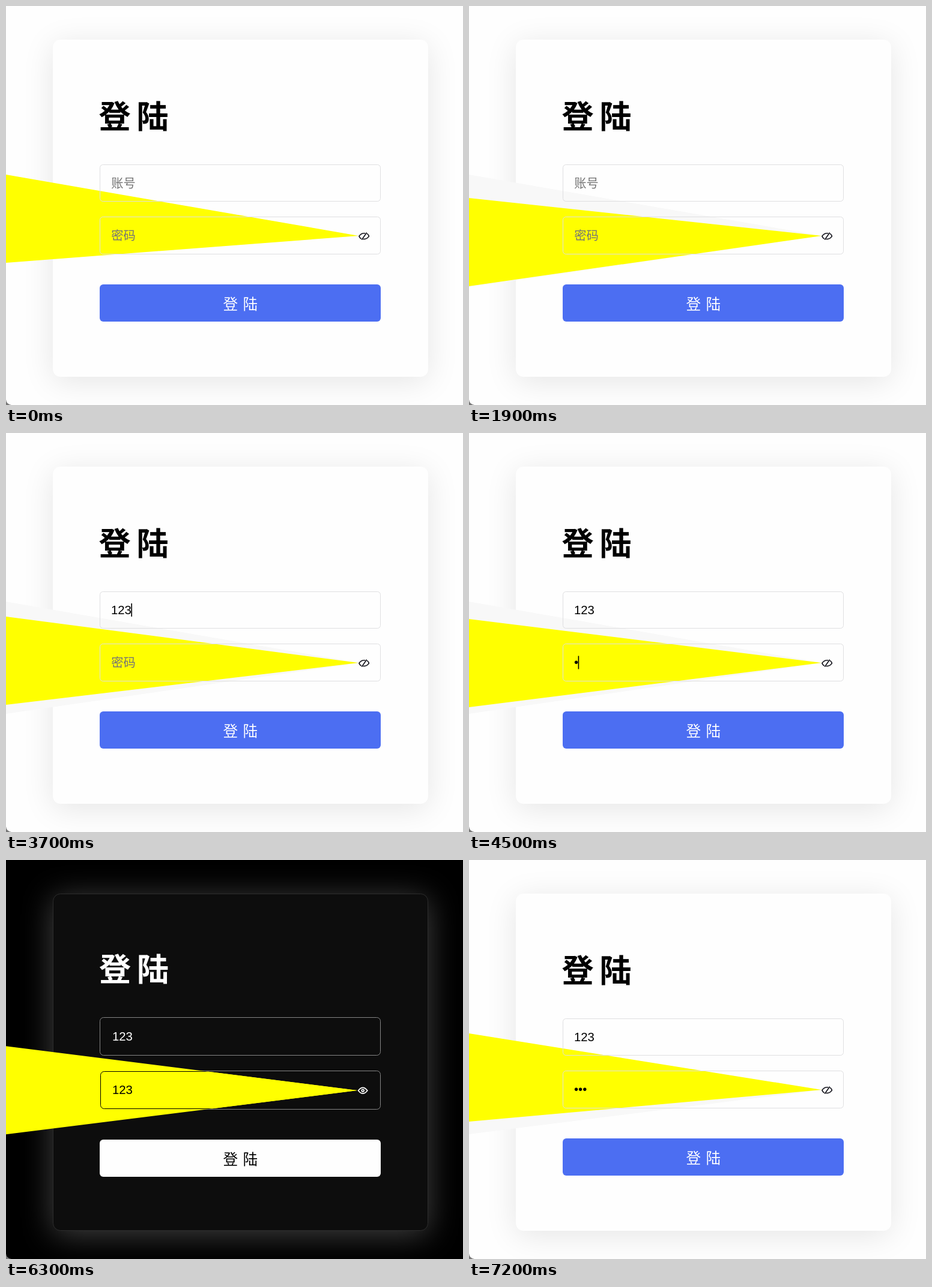
Write an HTML page that moves like this. It is 761 px wide and 665 px high and loops after 7500 ms.

```html
<!DOCTYPE html>
<html lang="zh-CN">
<head>
<meta charset="utf-8">
<title>登陆</title>
<style>
  html, body { margin: 0; width: 100%; height: 100%; overflow: hidden; background: #fefefe; }
  body.dark { background: #000; }
  .card {
    position: absolute; left: 78px; top: 56px; width: 625px; height: 562px;
    box-sizing: border-box; border-radius: 12.5px; background: #fefefe;
    box-shadow: 0 8px 52px rgba(0, 0, 0, .1);
  }
  .dark .card {
    background: #0d0d0d; border: 1px solid #2c2c2c;
    box-shadow: 0 6px 52px rgba(255, 255, 255, .26);
  }
  svg { position: absolute; left: 0; top: 0; display: block; }
  .dark .day, body:not(.dark) .night { display: none; }
  text { font: 20.3px "Liberation Sans", Arial, sans-serif; white-space: pre; }
  .cjk { font-family: "Noto Sans CJK SC", "Noto Sans CJK", sans-serif; }
  .title { font-size: 53px; font-weight: 700; letter-spacing: 10px; }
  .label { font-size: 24.6px; letter-spacing: 8.4px; }
  .hint { fill: #757575; }
  .field { fill: none; stroke: #dfdfe1; }
  .night .field { stroke: #858585; }
  .night .lit { stroke: #000; }
  .icon { fill: none; stroke: #17171f; stroke-width: 1.7; stroke-linecap: round; }
  .night .icon { stroke: #fff; }
</style>
</head>
<body>
<div class="card"></div>
<svg width="761" height="665" viewBox="0 0 761 665">
  <defs>
    <clipPath id="beamClip"><polygon class="beam"/></clipPath>
  </defs>
  <path d="M0 656Q1 664 9 665H0Z" fill="#777"/>
  <polygon id="trail" class="day" fill="#f8f8f8"/>
  <polygon class="beam" fill="#ff0"/>

  <g class="day">
    <text class="cjk title" x="154.5" y="204">登陆</text>
    <rect class="field" x="156.5" y="264.5" width="467" height="61" rx="5"/>
    <rect class="field" x="156.5" y="351.5" width="467" height="62" rx="5"/>
    <text id="userHint" class="cjk hint" x="175.3" y="302.5">账号</text>
    <text id="passHint" class="cjk hint" x="175.3" y="389.5">密码</text>
    <text id="user" x="175" y="302"></text>
    <text id="pass" x="175" y="389"></text>
    <rect id="caret" width="1.6" height="22"/>
    <g class="icon">
      <path d="M597.6 378.8Q591.2 378.4 588 383.8Q589.2 386.4 591.2 387.7"/>
      <path d="M592.8 389L600.3 378.2"/>
      <path d="M601.6 379.7Q603.6 381.3 604.4 383.6Q601.4 388.7 595.2 388.6"/>
    </g>
    <rect x="156" y="464" width="468" height="62" rx="6" fill="#4c6ef2"/>
    <text class="cjk label" x="361.5" y="505.5" fill="#fff">登陆</text>
  </g>

  <g class="night">
    <text class="cjk title" x="155" y="202" fill="#fff">登陆</text>
    <rect class="field" x="156.5" y="262.5" width="467" height="63" rx="6"/>
    <rect class="field" x="156.5" y="351.5" width="467" height="64" rx="6"/>
    <g clip-path="url(#beamClip)">
      <rect x="156" y="351" width="468" height="65" rx="6" fill="#ff0"/>
      <rect class="field lit" x="157.5" y="352.5" width="466" height="62" rx="6"/>
    </g>
    <text x="177" y="301" fill="#fff">123</text>
    <text x="177" y="390">123</text>
    <rect id="nightCaret" x="210" y="372" width="1" height="22"/>
    <g class="icon">
      <path d="M586.6 384.2Q594.2 374.4 601.8 384.2Q594.2 394 586.6 384.2Z"/>
      <circle cx="594.2" cy="384.2" r="1.9"/>
    </g>
    <rect x="156" y="466" width="468" height="62" rx="6" fill="#fefefe"/>
    <text class="cjk label" x="361.5" y="507.5">登陆</text>
  </g>
</svg>
<script>
  const LOOP = 7500, STEP = 100, SPAN = 147;
  const NIGHT = 5800, DAY = 6600;
  const $ = id => document.getElementById(id);
  const beams = document.querySelectorAll('.beam');

  // Time and height of the beam's upper edge at the left side
  const path = [
    [0, 281], [100, 281], [900, 297], [1100, 299], [1700, 320], [1800, 321],
    [1900, 320], [2600, 305], [3500, 305], [3700, 306], [4200, 310],
    [4700, 310], [5700, 309], [5800, 310.5], [6700, 310], [7200, 289], [LOOP, 289]
  ];

  function beamTop(t) {
    const i = path.findIndex(key => key[0] > t);
    const [t0, y0] = path[i - 1], [t1, y1] = path[i];
    return y0 + (y1 - y0) * (t - t0) / (t1 - t0);
  }

  // Area swept since the theme was last set
  function swept(t) {
    let lo = Infinity, hi = -Infinity;
    for (let s = t < DAY ? 0 : DAY; s <= t; s += STEP) {
      const y = beamTop(s);
      lo = Math.min(lo, y);
      hi = Math.max(hi, y);
    }
    return [lo, hi + SPAN];
  }

  const cone = (top, bottom, tip) => `0,${top} ${tip} 0,${bottom}`;
  const typed = (t, times) => times.filter(s => t >= s).length;
  const show = (el, on) => el.setAttribute('visibility', on ? 'inherit' : 'hidden');

  function render(t) {
    const dark = t >= NIGHT && t < DAY;
    document.body.classList.toggle('dark', dark);

    const top = beamTop(t), tip = dark ? '585,384' : '587,383';
    beams.forEach(b => b.setAttribute('points', cone(top, top + SPAN, tip)));
    $('trail').setAttribute('points', cone(...swept(t), tip));

    const userLen = typed(t, [3000, 3300, 3600]);
    const passLen = typed(t, [4500, 4800, 5100]);
    $('user').textContent = '123'.slice(0, userLen);
    $('pass').textContent = '•'.repeat(passLen);
    show($('userHint'), !userLen);
    show($('passHint'), !passLen);

    const inUser = t >= 2900 && t < 4100, inPass = t >= 4500 && t < 5600;
    show($('caret'), inUser || inPass);
    $('caret').setAttribute('x', 174.5 + (inPass ? passLen * 7.1 : userLen * 11.3));
    $('caret').setAttribute('y', inPass ? 371.5 : 284);
    show($('nightCaret'), t < 6300);
  }

  const start = performance.now();
  function tick() {
    const t = (performance.now() - start) % LOOP;
    render(Math.floor(t / STEP) * STEP);
    requestAnimationFrame(tick);
  }
  tick();
</script>
</body>
</html>
```
